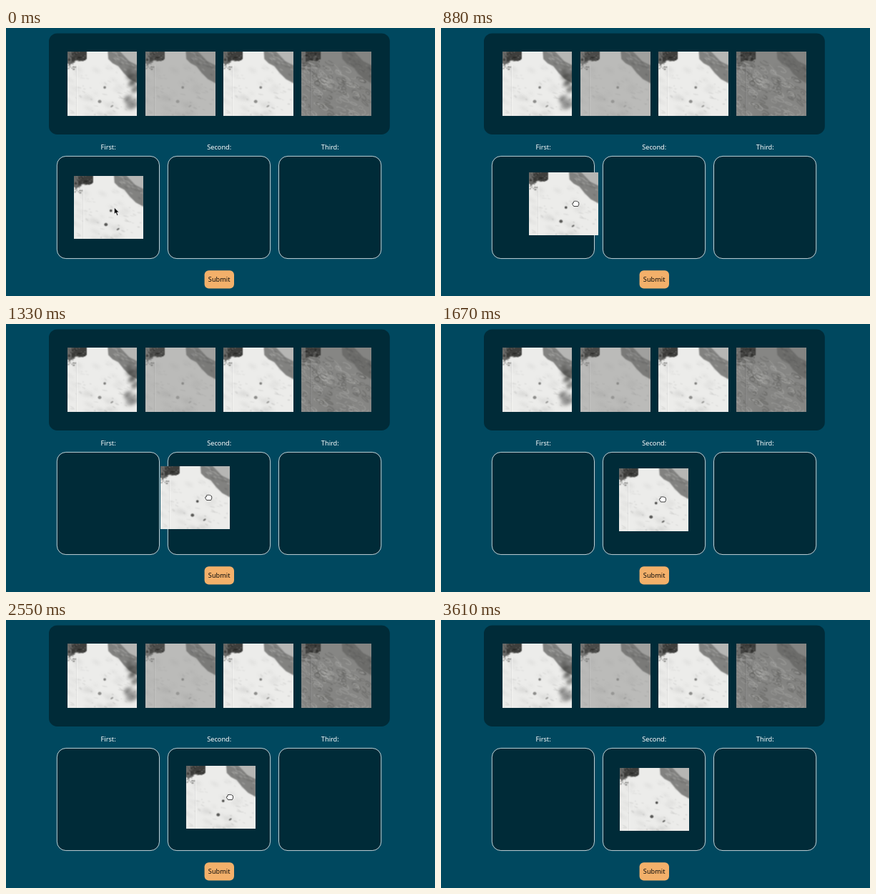
Recreate the animation shown at these times as an HTML page with a canvas. Size 600 px wide and 375 px high, loop 6.61 s.

```html
<!DOCTYPE html>
<html lang="en">
<head>
<meta charset="utf-8">
<title>Ordering task</title>
<style>
  html, body { margin: 0; width: 100%; height: 100%; overflow: hidden; background: #00485f; }
  svg, canvas { position: absolute; left: 0; top: 0; width: 600px; height: 375px; }
  text { font: 500 9.2px "Noto Sans", "Open Sans", sans-serif; text-anchor: middle; fill: #fff; }
  .well { fill: #002b38; }
  .slot { stroke: #e6edef; stroke-width: .85; }
  .submit { fill: #f3b06a; }
  .submit + text { fill: #0a0a0a; }
</style>
</head>
<body>
<svg id="board" viewBox="0 0 600 375">
  <rect class="well" x="60" y="7.5" width="476.8" height="141.4" rx="11.5"/>
  <rect class="submit" x="277.6" y="339.3" width="41.4" height="25.3" rx="6"/>
  <text x="298.2" y="355.3">Submit</text>
</svg>
<canvas id="photos" width="600" height="375"></canvas>
<script>
const LOOP = 6610, GRAB = 730, DROP = 3000, LEAVE = 3550, GONE = 3610, STEP = 60;

document.getElementById('board').insertAdjacentHTML('beforeend',
  ['First:', 'Second:', 'Third:'].map((name, i) => {
    const x = 71.3 + i * 155.1;
    return `<text x="${x + 71.8}" y="169.8">${name}</text>
      <rect class="well slot" x="${x}" y="179.4" width="143.2" height="143.2" rx="12.5"/>`;
  }).join(''));

function seeded(seed) {
  return () => (seed = (seed * 16807) % 2147483647) / 2147483647;
}

// Aerial view in 97 x 89 units; the look sets its tones and texture.
function aerial(look) {
  const canvas = document.createElement('canvas');
  canvas.width = 194;
  canvas.height = 178;
  const c = canvas.getContext('2d');
  const rnd = seeded(4271);
  const span = (a, b) => a + rnd() * (b - a);
  c.scale(2, 2);

  const grey = (v, a = 1) => `rgba(${v},${v},${v - 2},${a})`;
  const blob = (x, y, rx, ry, tone, turn = 0) => {
    c.fillStyle = tone;
    c.beginPath();
    c.ellipse(x, y, rx, ry, turn, 0, 7);
    c.fill();
  };
  const soft = (px, count, draw) => {
    c.filter = `blur(${px}px)`;
    for (let i = 0; i < count; i++) draw(i);
    c.filter = 'none';
  };
  const area = (tone, path) => {
    c.fillStyle = tone;
    c.fill(new Path2D(path));
  };

  c.fillStyle = grey(look.base);
  c.fillRect(0, 0, 97, 89);

  // Ground stains, denser to the left and bottom
  soft(4, 30, () => {
    const y = span(18, 92);
    blob(span(-4, 100 - y * 0.4), y, span(3, 9), span(1, 3), grey(look.stain, 0.12), 0.5);
  });
  soft(1.2, 50, () => {
    const y = span(20, 89);
    blob(span(0, 97), y, span(1, 4), span(0.4, 1.2), grey(look.stain, y / 400), span(0.1, 0.8));
  });

  // Rough scrubland
  soft(1, look.rough || 0, () => {
    c.strokeStyle = grey(rnd() < 0.6 ? 180 : 85, 0.4);
    c.lineWidth = span(0.7, 1.6);
    c.beginPath();
    c.ellipse(span(0, 97), span(14, 89), span(2, 8), span(1, 3), span(0.3, 0.8), span(0, 6), span(7, 9));
    c.stroke();
  });

  // Valley across the upper right, with a paler slope above it
  soft(1.4, 1, () => {
    area(grey(look.valley), 'M56-4H102V46L87 38 78 29 71 20 63 16 57 10Z');
    area(grey(look.slope), 'M70-4H102V21L86 13Z');
  });
  soft(1.4, 28, () => {
    const x = span(62, 97);
    blob(x, (x - 62) * 0.7 + span(-3, 12), span(1, 4), span(0.5, 1.3),
      grey(rnd() < 0.5 ? look.valley - 35 : look.slope + 10, 0.35), 0.6);
  });

  // Built-up block with field strips below
  soft(1.2, 1, () => {
    area(grey(look.town + 45), 'M-3-3H10V15L3 18-3 14Z');
    area(grey(look.town), 'M6-3H27V10L22 13 13 12 6 14Z');
  });
  soft(0.8, 40, () => {
    blob(span(0, 26), span(0, 14), span(0.5, 2), span(0.4, 1), grey(rnd() < 0.4 ? 150 : 25, 0.45));
  });
  soft(0.8, 16, () => {
    blob(span(1, 13), span(14, 26), span(0.8, 2), 0.7, grey(look.town + 20, 0.5));
  });

  // Scan line
  c.fillStyle = grey(look.base - 40, 0.4);
  c.fillRect(12.4, 20, 0.8, 69);
  c.fillStyle = grey(Math.min(255, look.base + 20), 0.5);
  c.fillRect(13.3, 18, 1, 71);

  // Small pits
  soft(1, 1, () => {
    blob(52, 49.5, 1.8, 1.7, grey(look.pit));
    blob(45, 69, 2.5, 2.2, grey(look.pit + 15));
    blob(62, 75.5, 2.2, 1.1, grey(look.pit + 25), -0.6);
  });

  // Dark haze at the right edge
  soft(5, look.haze || 0, i => {
    const y = span(26, 78);
    blob(100 - span(0, 18), y, span(2, 6), span(2, 4), grey(50, y < 58 ? 0.42 : 0.2), -0.6);
  });
  return canvas;
}

const bright = { base: 236, stain: 130, slope: 182, valley: 130, town: 62, pit: 72 };
const pale = { ...bright, pit: 125 };
const card = aerial(bright);
const gallery = [
  { ...pale, haze: 34 },
  { base: 187, stain: 130, slope: 160, valley: 122, town: 75, pit: 135 },
  pale,
  { base: 134, stain: 100, slope: 132, valley: 108, town: 65, pit: 118, rough: 150 }
].map(aerial);

// Drag key points: time, x, y
const keys = [
  [GRAB, 95, 206.5], [880, 123, 202], [1330, 216, 199], [1570, 248, 201], [1670, 249, 201.5],
  [1880, 250, 201.5], [2120, 250, 201.5], [2300, 231, 183.5], [2550, 252, 204],
  [2670, 252, 204], [2790, 229.5, 181], [DROP, 250, 206.5]
];

function cardAt(t) {
  const next = keys.findIndex(key => key[0] > t);
  if (next < 0) return keys[keys.length - 1].slice(1);
  if (next === 0) return keys[0].slice(1);
  const [t0, x0, y0] = keys[next - 1], [t1, x1, y1] = keys[next];
  const p = Math.floor((t - t0) / STEP) * STEP / (t1 - t0);
  return [x0 + (x1 - x0) * p, y0 + (y1 - y0) * p];
}

// The hand runs ahead of the card while it crosses over.
function handLead(t) {
  const p = Math.min(1, (t - GRAB) / 840);
  return 61 + 8 * Math.sin(Math.PI * p);
}

const arrow = new Path2D('M0 0V9.6L2.2 7.6 3.9 11.4 5.6 10.6 4 7H7Z');
const hand = new Path2D('M-2.6 4-4.6.8Q-4.8-.8-3-.6V-2.4Q-2.2-3.8-1-2.8 0-4 1.2-2.8 2.4-3.6 3-2.2 4.6-2.2 4.5-.4V1.6L3.4 4Z');
const ctx = document.getElementById('photos').getContext('2d');
ctx.imageSmoothingQuality = 'high';
ctx.lineJoin = 'round';
ctx.lineWidth = 0.8;

function pointer(path, x, y, fill, line) {
  ctx.save();
  ctx.translate(x, y);
  ctx.fillStyle = fill;
  ctx.strokeStyle = line;
  ctx.fill(path);
  ctx.stroke(path);
  ctx.restore();
}

function render(t) {
  const [x, y] = cardAt(t);
  ctx.clearRect(0, 0, 600, 375);
  gallery.forEach((view, i) => ctx.drawImage(view, 85.7 + i * 109.1, 33.3, 97.7, 89.7));
  ctx.drawImage(card, x, y, 96.5, 88.4);

  if (t >= GRAB && t < DROP) pointer(hand, x + handLead(t), y + 43.5, '#fff', '#111');
  else if (t < GRAB) pointer(arrow, 151.3, 251, '#0a0a0a', '#f4f4f4');
  else if (t < LEAVE) pointer(arrow, 312.5, 246.5, '#0a0a0a', '#f4f4f4');
  else if (t < GONE) pointer(arrow, 411.5, 97, '#0a0a0a', '#f4f4f4');
}

const start = performance.now();
function tick() {
  render((performance.now() - start) % LOOP);
  requestAnimationFrame(tick);
}
tick();
</script>
</body>
</html>
```
